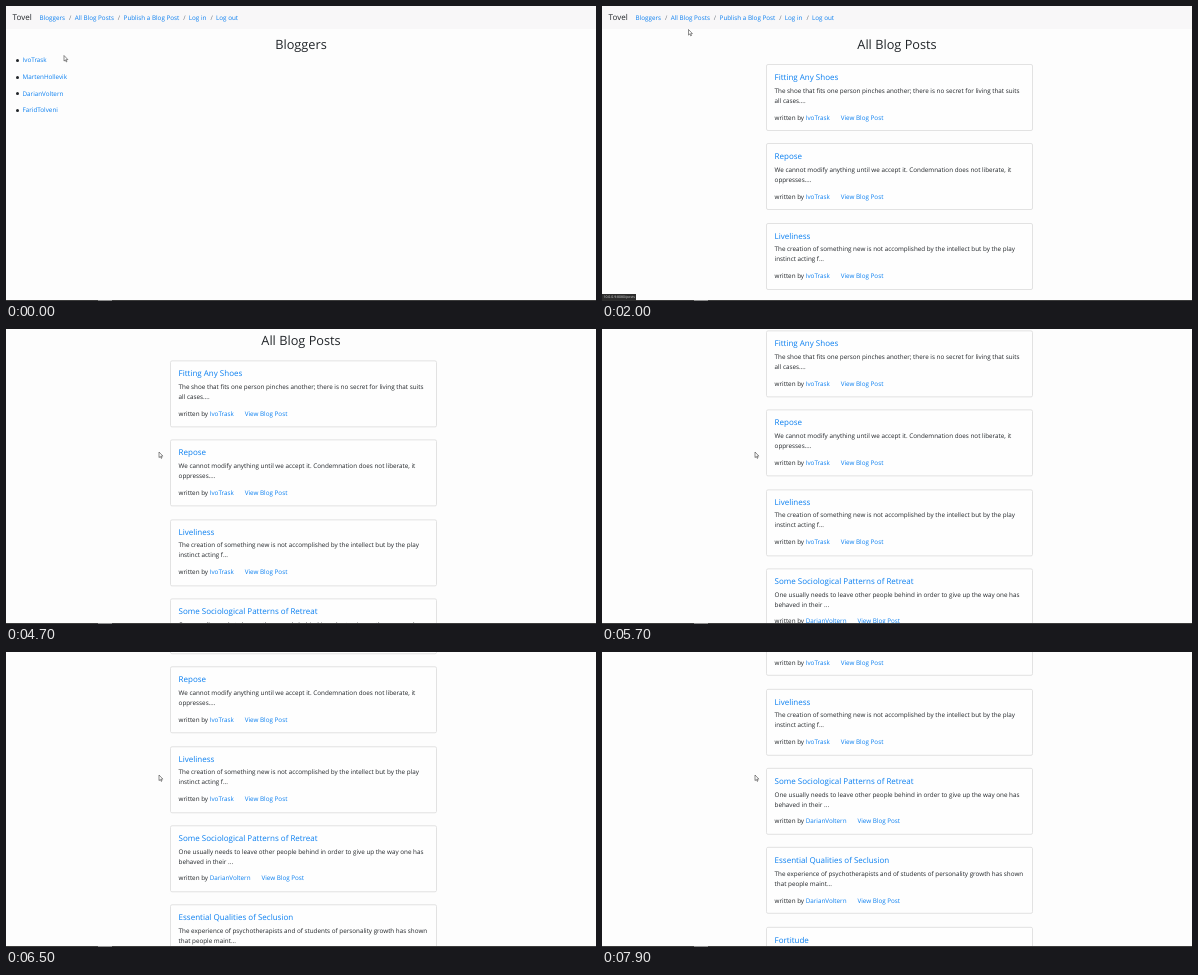
These frames come from a looping animation (590 px wide and 295 px high, 8000 ms). An HTML page:

```html
<!DOCTYPE html>
<html lang="en">
<head>
<meta charset="utf-8">
<title>Blog tour</title>
<style>
  html, body { margin: 0; width: 100%; height: 100%; overflow: hidden; }
  body { background: #fdfdfd; }
  #stage {
    position: relative; width: 590px; height: 295px; overflow: hidden;
    background: #fdfdfd; color: #212529;
    font: 6.3px/10px "Open Sans", "Noto Sans", sans-serif;
    text-rendering: geometricPrecision;
  }
  #page, .view { position: absolute; left: 0; top: 0; width: 590px; }
  nav { position: absolute; left: 0; top: 0; width: 590px; height: 23px; background: #f8f7f8; }
  .line { position: absolute; margin-top: -5px; white-space: pre; }
  .link { color: #0a7ff0; }
  .link.hover { color: #0056b3; text-decoration: underline; text-decoration-thickness: .5px; }
  .brand { font-size: 8px; }
  .slash { color: #6c757d; }
  .heading { left: 0; width: 590px; top: 38.3px; text-align: center; font-size: 12.75px; }
  .dot { position: absolute; left: 10.2px; width: 3px; height: 3px; border-radius: 50%; background: #212529; }
  .card {
    position: absolute; left: 164px; width: 267px; height: 67px; box-sizing: border-box;
    border: 1px solid #e2e2e2; border-radius: 2px; background: #fefefe;
  }
  .card .line { left: 7.6px; }
  .card .title { font-size: 8px; }
  .more { margin-left: 10.9px; }
  #edge { position: absolute; left: 0; top: 294px; width: 590px; height: 1px; background: #3c3c3c; }
  #edge::after { content: ""; position: absolute; left: 92px; width: 14px; height: 1px; background: #8c8c8c; }
  #status {
    position: absolute; left: 0; top: 288px; width: 34px; height: 7px;
    background: #2c2c2c; color: #d8d8d8; font-size: 3.46px; line-height: 7px;
    text-indent: 1.5px; white-space: pre;
  }
  #pointer { position: absolute; left: 0; top: 0; width: 10px; height: 10px; overflow: visible; }
  #pointer path { fill: #fff; stroke: #333; stroke-width: .55; stroke-linejoin: round; }
</style>
</head>
<body>
<div id="stage">
  <div id="page">
    <nav id="nav"></nav>
    <div class="view" id="people"><div class="line heading">Bloggers</div></div>
    <div class="view" id="posts"><div class="line heading">All Blog Posts</div></div>
  </div>
  <div id="edge"></div>
  <div id="status">10.0.0.9:8080/posts</div>
  <svg id="pointer" viewBox="0 0 10 10">
    <path id="arrow" d="M0 0V5.6L1.3 4.4 2.2 6.4 3 6 2.2 4.1H3.9Z"/>
    <path id="hand" d="M0 .4Q.5-.2 1 .4V2.3L3.6 2.9Q4.2 3.1 4.1 3.8L3.5 6.2H.6L-1.3 3.8Q-1.2 3-.5 3.4L0 3.9Z"/>
  </svg>
</div>
<script>
const LOOP = 8000, STEP = 100;
const $ = id => document.getElementById(id);

function add(parent, cls, text = "", style = {}) {
  const el = document.createElement("div");
  el.className = cls;
  el.textContent = text;
  for (const key in style) el.style[key] = style[key] + "px";
  parent.append(el);
  return el;
}

function addSpan(parent, cls, text) {
  const el = document.createElement("span");
  el.className = cls;
  el.textContent = text;
  parent.append(el);
}

// Navigation bar
const navY = 11.5;
add($("nav"), "line brand", "Tovel", { left: 6.6, top: navY });
const links = [
  [33.5, "Bloggers"], [68.7, "All Blog Posts"], [117.6, "Publish a Blog Post"],
  [182.8, "Log in"], [210, "Log out"]
].map(([left, text]) => add($("nav"), "line link", text, { left, top: navY }));
for (const left of [63, 111.8, 177.2, 204.4]) add($("nav"), "line slash", "/", { left, top: navY });
const postsLink = links[1];

// List of writers
["IvoTrask", "MartenHollevik", "DarianVoltern", "FaridTolveni"].forEach((name, i) => {
  const top = 54.4 + i * 16.65;
  add($("people"), "dot", "", { top: top - 1.5 });
  add($("people"), "line link", name, { left: 16.5, top });
});

// Post cards
const posts = [
  ["Fitting Any Shoes", "IvoTrask",
    "The shoe that fits one person pinches another; there is no secret for living that suits", "all cases...."],
  ["Repose", "IvoTrask",
    "We cannot modify anything until we accept it. Condemnation does not liberate, it", "oppresses...."],
  ["Liveliness", "IvoTrask",
    "The creation of something new is not accomplished by the intellect but by the play", "instinct acting f..."],
  ["Some Sociological Patterns of Retreat", "DarianVoltern",
    "One usually needs to leave other people behind in order to give up the way one has", "behaved in their ..."],
  ["Essential Qualities of Seclusion", "DarianVoltern",
    "The experience of psychotherapists and of students of personality growth has shown", "that people maint..."],
  ["Fortitude", "FaridTolveni", "", ""]
];
posts.forEach(([title, author, first, second], i) => {
  const card = add($("posts"), "card", "", { top: 58 + i * 79.3 });
  add(card, "line link title", title, { top: 13.2 });
  add(card, "line", first, { top: 25.7 });
  add(card, "line", second, { top: 35.7 });
  const foot = add(card, "line", "written by ", { top: 52.5 });
  addSpan(foot, "link", author);
  addSpan(foot, "link more", "View Blog Post");
});

// Keys: time, then values
const pointerKeys = [
  [0, 58, 49.5], [300, 46, 84], [500, 13, 100], [700, 44, 76], [900, 72, 27],
  [1000, 80, 15], [1200, 86, 11], [1700, 86, 11], [1800, 86, 13], [2000, 86.5, 23.5],
  [2500, 92, 44], [3000, 126, 96], [3400, 153, 123]
];
const scrollKeys = [
  [4100, 0], [4300, 3], [4700, 26.6], [5000, 43], [5400, 52], [5500, 52], [5700, 56.6],
  [6000, 80], [6500, 122.7], [7000, 146], [7100, 146], [7300, 150], [7900, 180.2]
];

function sample(keys, t) {
  const next = keys.findIndex(k => k[0] > t);
  if (next === 0) return keys[0].slice(1);
  if (next < 0) return keys[keys.length - 1].slice(1);
  const a = keys[next - 1], b = keys[next];
  const p = (t - a[0]) / (b[0] - a[0]);
  return a.slice(1).map((v, i) => v + (b[i + 1] - v) * p);
}

const show = (el, on) => { el.style.display = on ? "" : "none"; };

function draw(time) {
  const t = Math.floor((time % LOOP) / STEP) * STEP;
  const [x, y] = sample(pointerKeys, t);
  const [scroll] = sample(scrollKeys, t);
  const over = t >= 1000 && t < 1900;

  show($("people"), t < 1700);
  show($("posts"), t >= 1700);
  show($("status"), t >= 1100 && t < 2300);
  show($("arrow"), !over);
  show($("hand"), over);
  postsLink.classList.toggle("hover", over);
  $("pointer").style.transform = `translate(${x}px, ${y}px)`;
  $("page").style.transform = `translateY(${-scroll}px)`;
}

const start = performance.now();
function tick() {
  draw(performance.now() - start);
  requestAnimationFrame(tick);
}
tick();
</script>
</body>
</html>
```
